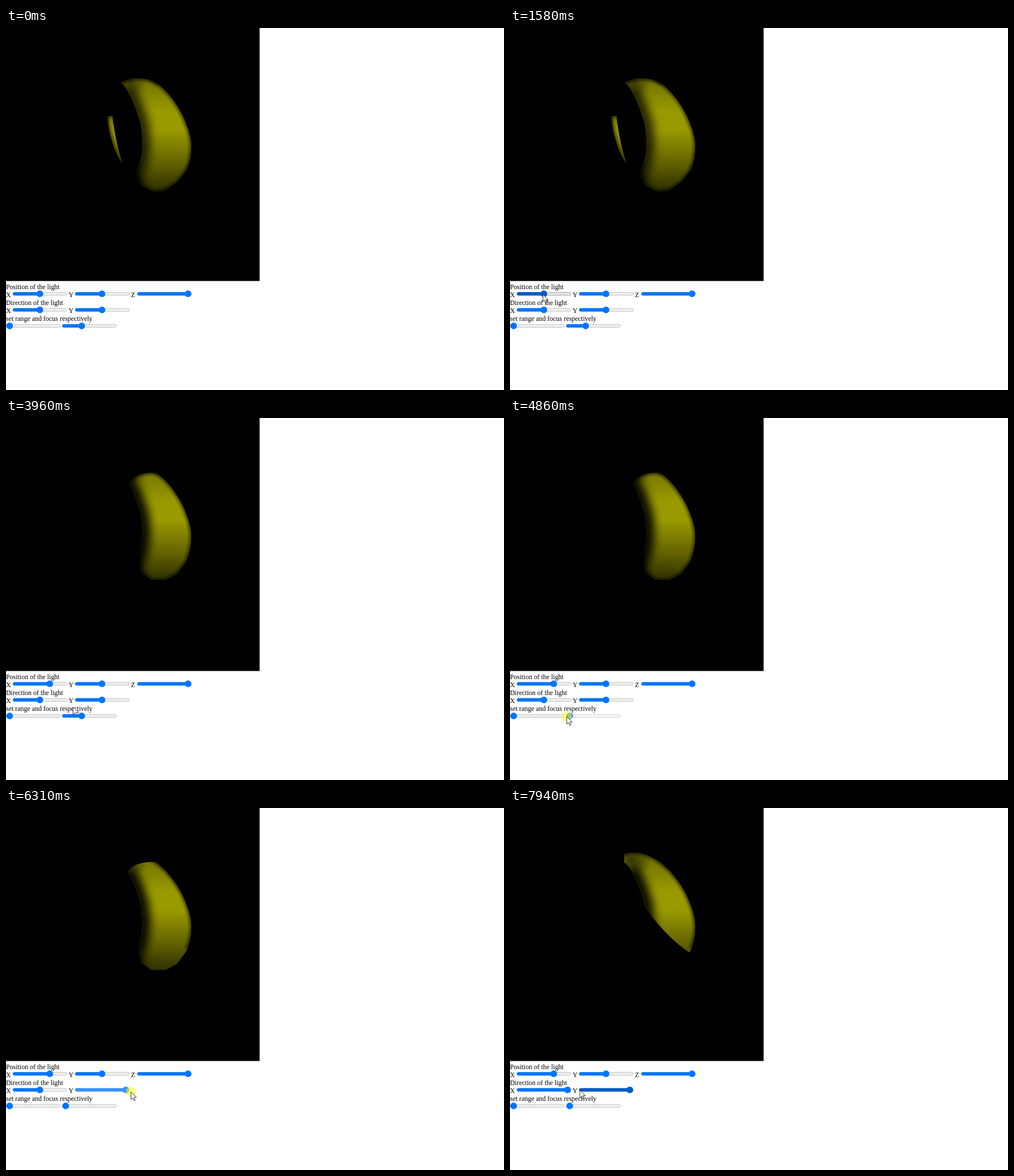
An HTML page for the animation above (8 s loop, 877 px wide and 639 px high).

```html
<!DOCTYPE html>
<html lang="en">
<head>
<meta charset="utf-8">
<title>Spotlight on a ring</title>
<style>
  html, body { margin: 0; width: 100%; height: 100%; overflow: hidden; background: #fff; }
  svg { display: block; width: 877px; height: 639px; }
  text { font: 11.93px "Liberation Serif", "Times New Roman", serif; }
</style>
</head>
<body>
<svg viewBox="0 0 877 639" xmlns="http://www.w3.org/2000/svg">
  <defs>
    <clipPath id="ring"><path d="M205 239C188 215 180 180 176 140C172 112 178 80 217 79C235 79 252 87 265 97C287 113 304 139 313 159C322 180 327 198 326 212C326 225 323 237 319 249L290 310H240L228 262Q230 247 235 240C242 215 241 195 238 172C232 148 222 124 212 107C206 99 203 96 199 97C190 101 186 122 187 150C189 175 197 215 205 239Z"/></clipPath>
    <clipPath id="spot"><path id="spotPath"/></clipPath>
    <linearGradient id="fall" gradientUnits="userSpaceOnUse" x1="0" y1="80" x2="0" y2="290">
      <stop offset="0" stop-opacity=".3"/>
      <stop offset=".32" stop-opacity="0"/>
      <stop offset=".48" stop-opacity="0"/>
      <stop offset=".75" stop-opacity=".35"/>
      <stop offset="1" stop-opacity=".72"/>
    </linearGradient>
    <radialGradient id="dim">
      <stop offset="0" stop-opacity=".5"/>
      <stop offset="1" stop-opacity="0"/>
    </radialGradient>
    <filter id="blurL" filterUnits="userSpaceOnUse" x="120" y="30" width="260" height="320"><feGaussianBlur stdDeviation="8"/></filter>
    <filter id="blurS" filterUnits="userSpaceOnUse" x="120" y="30" width="260" height="320"><feGaussianBlur stdDeviation="2.5"/></filter>
  </defs>
  <rect width="446.6" height="446.6"/>
  <g clip-path="url(#ring)">
    <g clip-path="url(#spot)" fill="none" stroke="#000">
      <rect x="150" y="60" width="200" height="260" fill="#999900" stroke="none"/>
      <rect x="150" y="60" width="200" height="260" fill="url(#fall)" stroke="none"/>
      <ellipse cx="214" cy="92" rx="36" ry="30" fill="url(#dim)" stroke="none"/>
      <path id="inner" d="M228 290V262Q230 247 235 240C242 215 241 195 238 172C232 148 222 124 212 107" stroke-width="28" filter="url(#blurL)"/>
      <path d="M205 239C188 215 180 180 176 140C172 112 178 80 217 79C235 79 252 87 265 97C287 113 304 139 313 159C322 180 327 198 326 212C326 225 323 237 319 249" stroke-width="6" opacity=".6" filter="url(#blurS)"/>
      <path id="edge" stroke-width="5" opacity=".7" filter="url(#blurS)"/>
    </g>
  </g>
  <g id="labels"></g>
  <g id="sliders"></g>
  <circle id="halo" r="9" fill="#ff0" fill-opacity=".5"/>
  <path id="cursor" d="M0 0V13.4L3 10.6 5.3 15.6 7.5 14.6 5.3 9.8H9.6Z" fill="#fff" stroke="#000" stroke-width=".8"/>
</svg>
<script>
const LOOP = 8000, STEP = 70, WIDTH = 95, THUMB = 5.9;
const $ = id => document.getElementById(id);
const clamp = (v, lo, hi) => Math.min(hi, Math.max(lo, v));

function add(parent, tag, attrs) {
  const el = document.createElementNS("http://www.w3.org/2000/svg", tag);
  set(el, attrs);
  parent.appendChild(el);
  return el;
}
function set(el, attrs) {
  for (const k in attrs) el.setAttribute(k, attrs[k]);
}

[
  [0, 461, "Position of the light"], [0, 475, "X"], [110.3, 475, "Y"], [220, 475, "Z"],
  [0, 489, "Direction of the light"], [0, 503.2, "X"], [110.3, 503.2, "Y"],
  [0, 517.3, "set range and focus respectively"]
].forEach(([x, y, s]) => { add($("labels"), "text", { x, y }).textContent = s; });

// lit areas: time from which it shows, softness of edge, strength of inner shade, outline
const rest = "L340 98V230L319 249 302 271 280 286";
const low = "L340 98V230L318 252 301 275 280 286H257L239 273Q234 260 235 246L236 205Z";
const scenes = [
  [0, .7, .75, "M203 97Q211 90 232 89Q254 90 266 98" + rest +
    "Q268 289 258 288L238 277Q229 262 231 247L236 205ZM178 158Q182 155 188 155L215 240H170Z"],
  [2340, .7, .85, "M209 103Q218 93 243 91Q256 92 262 95" + rest +
    "L258 287 239 275Q231 262 232 249L236 205ZM194 198L190 207 203 239 215 240Z"],
  [3200, .7, .95, "M217 117Q222 104 240 99Q255 95 266 98" + low],
  [5000, 0, .95, "M215 113Q222 101 240 97Q254 94 264 96" + low],
  [6580, 0, .95, "M150 60H340V230L318 253Q275 259 234 249L220 206H170Z"],
  [7730, 0, .95, "M201 96V82Q210 70 240 70H340V230L316 255Q275 228 239 176L212 120Z"]
];

// pointer moves: start time, steps, end point, optional bend
const entry = [929, 750];
const moves = [
  [340, 9, [246, 432], [500, 150]],
  [1100, 7, [58, 470]],
  [1930, 3, [66, 467]],
  [2800, 2, [76, 465]],
  [3400, 12, [132, 525]],
  [4510, 6, [100, 527]],
  [5000, 5, [112, 522]],
  [5350, 7, [168, 497]],
  [5960, 6, [220, 501]],
  [6580, 10, [60, 497]],
  [7390, 4, [103, 498]],
  [7730, 4, [123, 498]]
];

// slider index, press time, release time
const drags = [[0, 1930, 2340], [0, 2600, 3200], [6, 4240, 5000], [4, 5960, 6580], [3, 7310, 7730]];

const sliders = [
  [12.3, 469.2, 59.6], [121.9, 469.2, 169], [231.5, 469.2, 330],
  [12.3, 497.6, 59.6], [121.9, 497.6, 169],
  [.5, 525.8, 0], [99.3, 525.8, 133.3]
].map(([x, y, value]) => {
  const g = $("sliders"), h = 5.2;
  const track = add(g, "rect", { x, y: y - h / 2, width: WIDTH, height: h, rx: h / 2, "stroke-width": .75 });
  const bar = add(g, "rect", { x: x - .3, y: y - 3, height: 6, rx: 3 });
  const thumb = add(g, "circle", { cy: y, r: THUMB });
  return { x, y, value, track, bar, thumb };
});

const looks = {
  idle: ["#0075ff", "#efefef", "#b2b2b2"],
  hover: ["#005cc8", "#e5e5e5", "#858585"],
  press: ["#3793ff", "#f5f5f5", "#cbcbcb"]
};

function pointer(t) {
  let pos = entry;
  for (const [start, n, end, bend] of moves) {
    if (t < start) break;
    const p = Math.min(1, (Math.floor((t - start) / STEP) + 1) / n), q = 1 - p, from = pos;
    pos = end.map((e, i) => {
      const c = bend ? bend[i] : (from[i] + e) / 2;
      return q * q * from[i] + 2 * p * q * c + p * p * e;
    });
  }
  return pos;
}

function drawSlider(s, i, t, [px, py], held) {
  let v = s.value;
  for (const [id, down, up] of drags)
    if (id === i && t >= down) v = pointer(Math.min(t, up - 1))[0] + 1;
  v = clamp(v, s.x + THUMB, s.x + WIDTH - THUMB);
  const over = px >= s.x && px <= s.x + WIDTH && Math.abs(py - s.y) < 6;
  const look = held ? (held[0] === i ? "press" : "idle") : over ? "hover" : "idle";
  const [blue, grey, line] = looks[look];
  set(s.track, { fill: grey, stroke: line });
  set(s.bar, { width: v - s.x, fill: blue });
  set(s.thumb, { cx: v, fill: blue });
}

let shown = null;
function draw(t) {
  const scene = scenes.filter(s => t >= s[0]).pop();
  if (scene !== shown) {
    shown = scene;
    const [, soft, shade, d] = scene;
    set($("spotPath"), { d });
    set($("edge"), { d, opacity: soft });
    set($("inner"), { opacity: shade });
  }
  const pos = pointer(t), held = drags.find(d => t >= d[1] && t < d[2]);
  sliders.forEach((s, i) => drawSlider(s, i, t, pos, held));
  const at = `translate(${pos})`;
  set($("cursor"), { transform: at, visibility: t < 340 ? "hidden" : "visible" });
  set($("halo"), { transform: at, visibility: held ? "visible" : "hidden" });
}

const begin = performance.now();
function tick() {
  draw((performance.now() - begin) % LOOP);
  requestAnimationFrame(tick);
}
tick();
</script>
</body>
</html>
```
